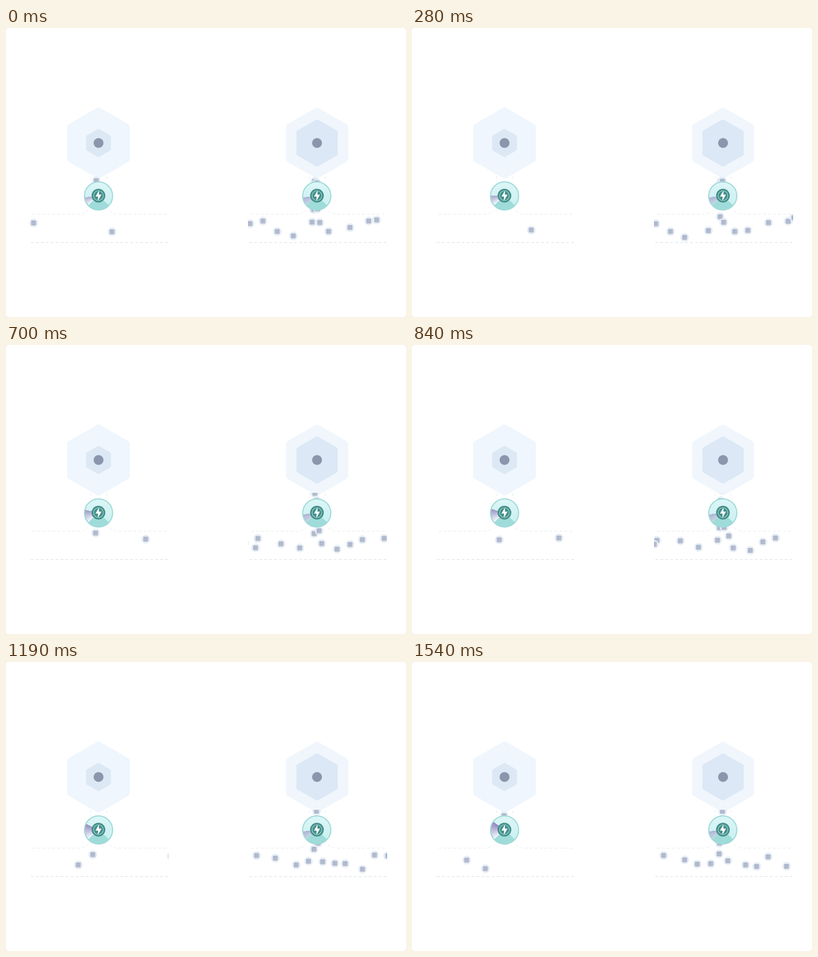
Write an HTML page without scripts that moves like this. It is 724 px wide and 524 px high and loops after 1.61 s.

```html
<!DOCTYPE html>
<html lang="en">
<head>
<meta charset="utf-8">
<title>Packet flow</title>
<style>
  @property --fill { syntax: "<angle>"; inherits: false; initial-value: 36deg; }
  @property --tip { syntax: "<color>"; inherits: false; initial-value: #adb3d4; }

  html, body { margin: 0; width: 100%; height: 100%; overflow: hidden; background: #9a9a9a; }
  .stage { position: relative; width: 724px; height: 524px; overflow: hidden; border-radius: 2px; background: #fff; }
  svg { position: absolute; left: 0; top: 0; }

  #hexagon { stroke-linejoin: round; vector-effect: non-scaling-stroke; }
  .pipe { fill: none; stroke: #e7eaec; stroke-dasharray: 5 4; }

  /* Packets travel along a route; --d is the start distance, --v the relative speed */
  .packets use { --v: 1; offset-rotate: 0deg; animation: travel 1610ms infinite; }
  @keyframes travel {
    0% { offset-distance: calc(var(--d) * 1px); animation-timing-function: steps(4); }
    17.391% { offset-distance: calc(var(--d) * 1px + 24.3px * var(--v)); animation-timing-function: steps(19); }
    100% { offset-distance: calc(var(--d) * 1px + 150.3px * var(--v)); }
  }
  .left { offset-path: path("M163.5 120V275L161 331 162.5 344 157.5 354 151.5 362 147.5 365 139.5 368 130.5 368 118.5 366 100.5 360 92.5 356 76.5 350 68.5 350 58.5 351 45.5 355 20 366"); }
  .left-mid { offset-path: path("M95.5 369H72.5L53.5 364 20 354"); }
  .left-low { offset-path: path("M167.5 120V275L165 331 161.5 344 158 348 150 360 142 369 131 376 124.5 377 96.5 380 71.5 374 54.5 367 20 350"); }
  .right { offset-path: path("M166.5 120V275L169.5 331 170.5 345 172.5 353 176.5 361 182 366.5 190 369.5 199.5 369.5 210.5 367.5 217.5 366 226.5 362 232.5 360 249.5 353 260.5 350 272.5 350 287.5 350.5 320 355"); }
  .right-low { offset-path: path("M168.5 324V352L187.5 365 206.5 371 233.5 375 253.5 376 290 369"); }
  .right-mid { offset-path: path("M166.5 250L168 320 171.5 338 185.5 356 199.5 365 229.5 371 260 374"); }
  .right-high { offset-path: path("M275.5 348L320 339"); }

  .packets .leaving { animation: travel 1610ms infinite, leave 1610ms step-end infinite; }
  .packets .joining { animation: travel 1610ms infinite, join 1610ms step-end infinite; }
  @keyframes leave { 0% { opacity: 1; } 4.348%, 100% { opacity: 0; } }
  @keyframes join { 0% { opacity: 0; } 21.739%, 100% { opacity: 1; } }

  .gauge {
    --tail: #f3f7fc;
    position: absolute; left: 140.8px; top: 277.5px; width: 53px; height: 53px;
    box-sizing: border-box; border: 2.6px solid #9edad8; border-radius: 50%;
    background:
      conic-gradient(from 228deg, var(--tail) 0, var(--tip) var(--fill), transparent 0 264deg, #9fdcd9 0),
      linear-gradient(#dcf6f7, #c8efef);
  }
  .gauge.second { --tail: #c9d6e6; left: 536.3px; }
  .gauge.rising { animation: rise 1610ms steps(23) infinite; }
  @keyframes rise {
    from { --fill: 36deg; --tip: #aeabcf; }
    to { --fill: 80deg; --tip: #9083be; }
  }
</style>
</head>
<body>
<div class="stage">
  <svg width="724" height="524" viewBox="0 0 724 524">
    <defs>
      <linearGradient id="shade" x2="1" y2="1">
        <stop stop-color="#aab7d0"/>
        <stop offset="1" stop-color="#b8bdca"/>
      </linearGradient>
      <clipPath id="lane"><rect x="42.5" y="268" width="252" height="122"/></clipPath>
      <path id="hexagon" d="M0-1.1547L1-.5774V.5774L0 1.1547-1 .5774V-.5774Z"/>
      <g id="packet">
        <circle r="8" fill="#e6edf5" opacity=".9"/>
        <rect x="-4.5" y="-4.5" width="9" height="9" rx="1.5" fill="url(#shade)"/>
      </g>
      <g id="pipes" class="pipe">
        <path d="M48 337.5H133Q141 337 148 331M290 337.5H202Q194 337 187 331"/>
        <path d="M153.5 269V279M182.5 269V279"/>
        <path d="M45 389H294.5" stroke="#e3e7ea" stroke-width="1.3"/>
      </g>
    </defs>

    <g transform="translate(167.5 208.5)">
      <use href="#hexagon" transform="scale(51.5)" fill="#eff6fd" stroke="#eff6fd" stroke-width="10"/>
      <use href="#hexagon" transform="scale(20)" fill="#dde8f5" stroke="#dde8f5" stroke-width="5"/>
      <circle r="9" fill="#8b96ad"/>
    </g>
    <g transform="translate(563 208.5)">
      <use href="#hexagon" transform="scale(51.3)" fill="#f0f6fc" stroke="#f0f6fc" stroke-width="10"/>
      <use href="#hexagon" transform="scale(34)" fill="#dce8f5" stroke="#dce8f5" stroke-width="7"/>
      <circle r="9" fill="#8b96ad"/>
    </g>

    <use href="#pipes"/>
    <g class="packets" clip-path="url(#lane)">
      <use href="#packet" class="left" style="--d:352"/>
      <use href="#packet" class="left" style="--d:157"/>
      <use href="#packet" class="left-low" style="--d:112;--v:1.08"/>
      <use href="#packet" class="right" style="--d:260.5"/>
      <use href="#packet" class="right" style="--d:61"/>
      <use href="#packet" class="right" style="--d:15"/>
    </g>

    <g transform="translate(395.5)">
      <use href="#pipes"/>
      <g class="packets" clip-path="url(#lane)">
        <use href="#packet" class="left" style="--d:356"/>
        <use href="#packet" class="left" style="--d:332"/>
        <use href="#packet" class="left joining" style="--d:277"/>
        <use href="#packet" class="left" style="--d:233"/>
        <use href="#packet" class="left leaving" style="--d:209"/>
        <use href="#packet" class="left" style="--d:198"/>
        <use href="#packet" class="left" style="--d:158"/>
        <use href="#packet" class="left" style="--d:134"/>
        <use href="#packet" class="left" style="--d:109"/>
        <use href="#packet" class="left" style="--d:85"/>
        <use href="#packet" class="left" style="--d:65"/>
        <use href="#packet" class="left-mid" style="--d:0;--v:.95"/>
        <use href="#packet" class="left-low" style="--d:275.8;--v:1.1"/>
        <use href="#packet" class="right" style="--d:333"/>
        <use href="#packet" class="right" style="--d:297"/>
        <use href="#packet" class="right" style="--d:257"/>
        <use href="#packet" class="right" style="--d:233"/>
        <use href="#packet" class="right" style="--d:177"/>
        <use href="#packet" class="right" style="--d:133.5"/>
        <use href="#packet" class="right" style="--d:98"/>
        <use href="#packet" class="right" style="--d:40"/>
        <use href="#packet" class="right" style="--d:7"/>
        <use href="#packet" class="right-low" style="--d:4"/>
        <use href="#packet" class="right-mid" style="--d:30.8;--v:.88"/>
        <use href="#packet" class="right-high" style="--d:0;--v:.85"/>
      </g>
    </g>
  </svg>

  <div class="gauge rising"></div>
  <div class="gauge second"></div>

  <svg width="724" height="524" viewBox="0 0 724 524">
    <defs>
      <g id="bolt">
        <circle r="12.4" fill="#438f8a"/>
        <circle r="8.8" fill="none" stroke="#9fd0cd" stroke-width="1.3"/>
        <path d="M1.8-11.5L-6 2H-1L-2 12 6.2-2.2H1.2Z" fill="#fff" stroke="#438f8a" stroke-width=".8"/>
      </g>
    </defs>
    <use href="#bolt" x="167.3" y="304"/>
    <use href="#bolt" x="562.8" y="304"/>
  </svg>
</div>
</body>
</html>
```
